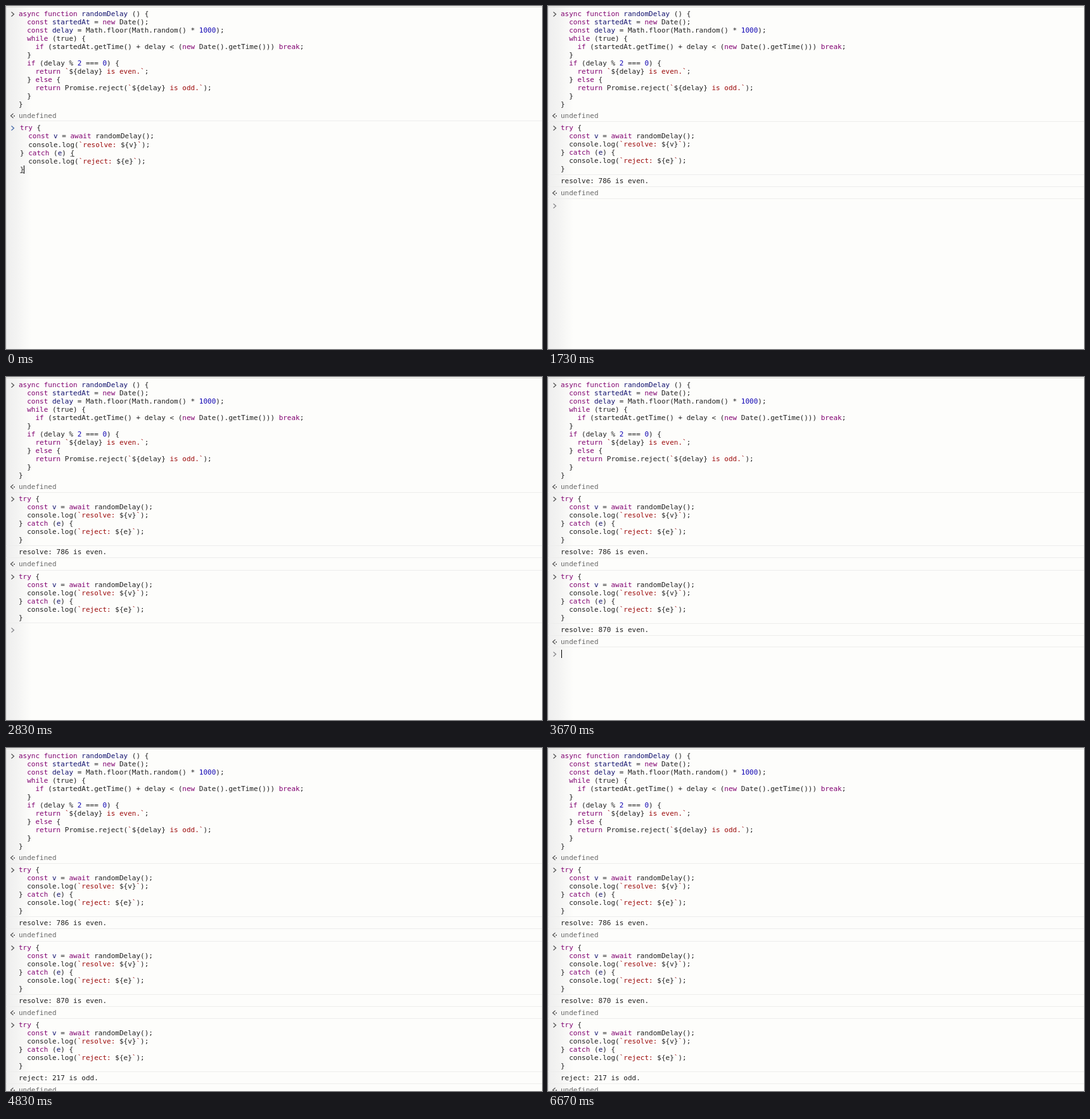
An HTML page for the animation above (6710 ms loop, 846 by 542 pixels).

```html
<!DOCTYPE html>
<html lang="en">
<head>
<meta charset="utf-8">
<title>Console</title>
<style>
  html, body { margin: 0; width: 100%; height: 100%; overflow: hidden; background: #fdfdfb; }
  svg { display: block; }
  text { font: 11px "DejaVu Sans Mono", monospace; white-space: pre; fill: #202020; }
  .keyword { fill: #800070; }
  .def { fill: #10106e; }
  .number { fill: #1005b4; }
  .string { fill: #9c0c0c; }
  .muted { fill: #686868; }
  path { fill: none; stroke-width: 1.2; }
</style>
</head>
<body>
<svg width="846" height="542" viewBox="0 0 846 542">
  <defs>
    <linearGradient id="edge">
      <stop offset="0" stop-color="#eeeeee"/>
      <stop offset=".4" stop-color="#f3f3f2"/>
      <stop offset="1" stop-color="#fdfdfb"/>
    </linearGradient>
  </defs>
  <rect width="846" height="542" fill="#fdfdfb"/>
  <rect width="40" height="542" fill="url(#edge)"/>
  <rect width="1" height="542" fill="#dcdcdc"/>
  <rect y="1" width="846" height="1" fill="#d4d4d0"/>
  <g id="log"></g>
</svg>
<script>
const LOOP = 6710;
const CHAR = 6.622;
const log = document.getElementById('log');

const definition = [
  'async function randomDelay () {',
  '  const startedAt = new Date();',
  '  const delay = Math.floor(Math.random() * 1000);',
  '  while (true) {',
  '    if (startedAt.getTime() + delay < (new Date().getTime())) break;',
  '  }',
  '  if (delay % 2 === 0) {',
  '    return `${delay} is even.`;',
  '  } else {',
  '    return Promise.reject(`${delay} is odd.`);',
  '  }',
  '}'
];
const attempt = [
  'try {',
  '  const v = await randomDelay();',
  '  console.log(`resolve: ${v}`);',
  '} catch (e) {',
  '  console.log(`reject: ${e}`);',
  '}'
];

// y is the centre of the first line; times are in ms.
const runs = [
  { y: 192, recall: 0, enter: 533, done: 1340, output: 'resolve: 786 is even.' },
  { y: 315, recall: 1960, enter: 2300, done: 3170, output: 'resolve: 870 is even.' },
  { y: 437, recall: 3800, enter: 4200, done: 4430, output: 'reject: 217 is odd.' }
];

const span = (kind, s) => `<tspan class="${kind}">${s}</tspan>`;
const escapeText = s => s.replace(/&/g, '&amp;').replace(/</g, '&lt;');
const text = (x, y, s, kind = '') => `<text x="${x}" y="${y + 4}" class="${kind}">${s}</text>`;
const rect = (x, y, w, h, fill) => `<rect x="${x}" y="${y}" width="${w}" height="${h}" fill="${fill}"/>`;
const separator = y => rect(0, y, 846, 1, '#ededec');
const cursor = (x, y) => rect(x, y - 6, 1, 13, '#000');
const arrow = (y, color = '#505050') =>
  `<path d="M8.5 ${y - 2.5}l4 3.5l-4 3.5" stroke="${color}"/>`;

const codeToken = /(?<=function |const |catch \()\w+|\b(?:async|function|const|new|while|if|break|return|else|try|catch|await)\b|\b\d+\b/g;

function highlightCode(s) {
  return escapeText(s).replace(codeToken, (word, at, whole) => {
    if (/\d/.test(word)) return span('number', word);
    return span(/(function |const |catch \()$/.test(whole.slice(0, at)) ? 'def' : 'keyword', word);
  });
}

const highlightTemplate = s => s.split(/(\$\{\w+\})/)
  .map((part, i) => i % 2 ? part : span('string', part)).join('');

const highlight = line => line.split(/(`[^`]*`)/)
  .map((part, i) => i % 2 ? highlightTemplate(part) : highlightCode(part)).join('');

const code = (lines, x, y, pitch = 13) =>
  lines.map((line, i) => text(x, Math.round(y + i * pitch), highlight(line))).join('');

const returned = y =>
  `<path d="M11.5 ${y - 3}l-4 3.5l4 3.5" stroke="#505050"/>` +
  rect(12, y, 2, 1.5, '#505050') + text(20, y, 'undefined', 'muted');

const matchedBracket = (x, y) => rect(x, y + 5, CHAR, 1, '#707070');

function editor(y) {
  return separator(y - 11) + arrow(y, '#4468a8') +
    matchedBracket(22 + 12 * CHAR, y + 40) + matchedBracket(22, y + 66) +
    code(attempt, 22, y, 13.25) + cursor(28, y + 66);
}

const prompt = y => separator(y - 11) + arrow(y, '#858588');

function drawRun(run, t, previous) {
  const { y } = run;
  if (t < run.recall) {
    if (!previous || t < previous.done) return '';
    const blink = (t - previous.done) % 1000 >= 450;
    return prompt(y) + (blink ? cursor(21, y) : '');
  }
  if (t < run.enter) return editor(y);
  const entered = separator(y - 10) + arrow(y) + code(attempt, 20, y);
  if (t < run.done) return entered + prompt(y + 84);
  return entered + separator(y + 74) + text(20, y + 84, run.output) +
    separator(y + 93) + returned(y + 103);
}

const header = arrow(12) + code(definition, 20, 12) + returned(173);
let shown = '';

function frame(now) {
  const t = now % LOOP;
  const markup = header + runs.map((run, i) => drawRun(run, t, runs[i - 1])).join('');
  if (markup !== shown) log.innerHTML = shown = markup;
  requestAnimationFrame(frame);
}
frame(0);
</script>
</body>
</html>
```
